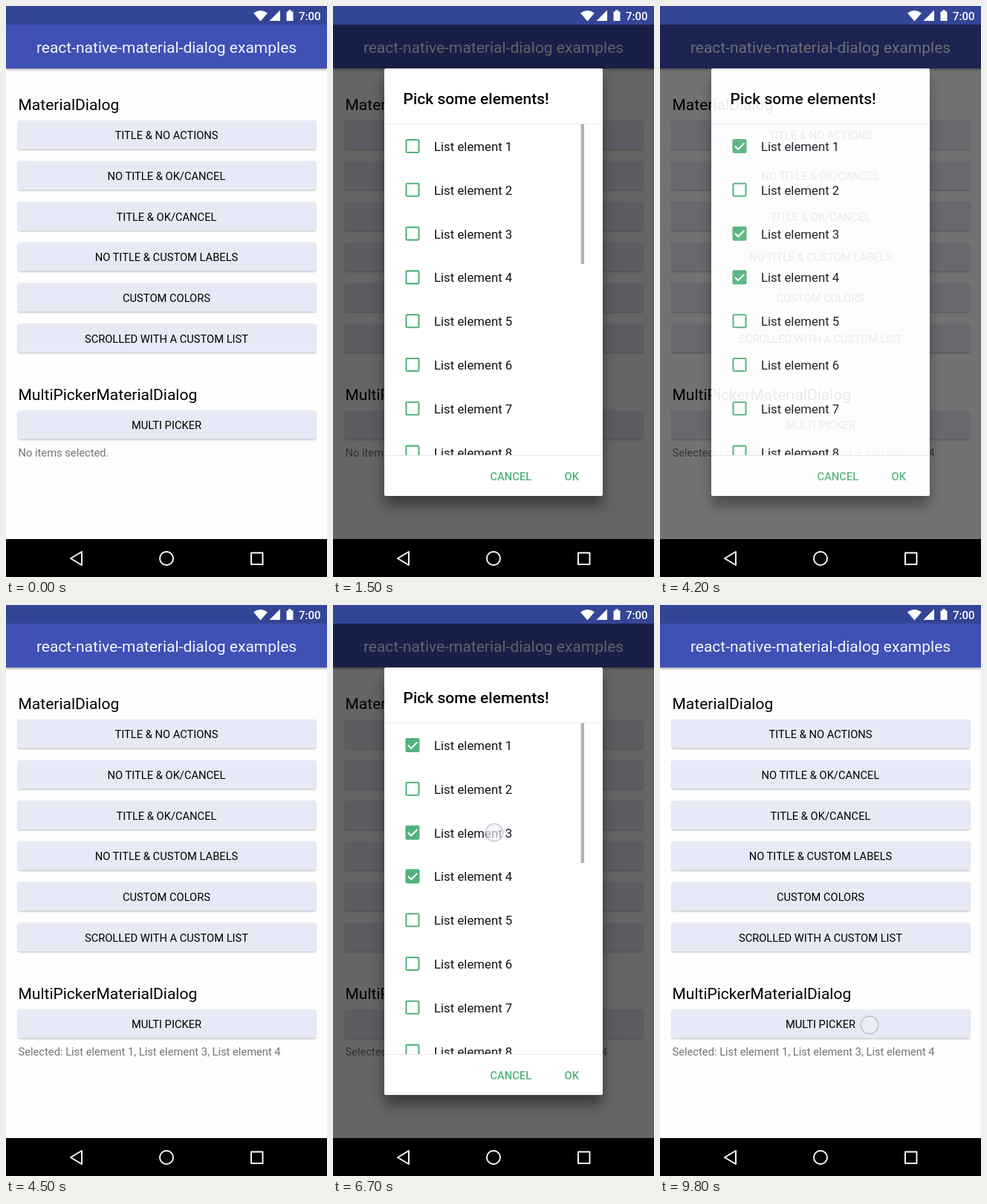
These frames come from a looping animation (432 by 768 pixels, 10000 ms). An HTML page:

```html
<!DOCTYPE html>
<html lang="en">
<head>
<meta charset="utf-8">
<title>Multi picker dialog</title>
<style>
  html, body { margin: 0; width: 100%; height: 100%; overflow: hidden; background: #fff; }
  svg { display: block; width: 432px; height: 768px; font: 14.7px Roboto, sans-serif; }
  .big { font-size: 21px; }
  .medium { font-weight: 500; }
  .item { font-size: 16.8px; fill: #101018; }
  .center { text-anchor: middle; }
  .panel { filter: drop-shadow(0 13px 9px rgba(0, 0, 0, .42)); }
  .button { fill: #e7eaf6; filter: drop-shadow(0 1.5px 1px rgba(0, 0, 0, .28)); }
  .bar { filter: drop-shadow(0 2px 1.5px rgba(0, 0, 0, .3)); }
</style>
</head>
<body>
<svg viewBox="0 0 432 768">
  <defs>
    <clipPath id="listClip"><rect x="69" y="159" width="294" height="445"/></clipPath>
    <clipPath id="buttonClip"><rect x="16" y="544" width="401" height="39" rx="2"/></clipPath>
  </defs>
  <rect width="432" height="768" fill="#fefefe"/>
  <rect class="bar" y="20" width="432" height="64" fill="#3f51b5"/>
  <text class="big center" x="216" y="63" fill="#f4f5fb">react-native-material-dialog examples</text>
  <text class="big" x="16.5" y="140">MaterialDialog</text>
  <text class="big" x="16.5" y="530">MultiPickerMaterialDialog</text>
  <g id="buttons"></g>
  <g clip-path="url(#buttonClip)"><circle id="ripple" cx="282" cy="565" fill="#1c2340"/></g>
  <text id="summary" x="16.5" y="606" fill="#757575"></text>

  <g id="modal">
    <rect y="25" width="432" height="692" fill="#000" fill-opacity=".6"/>
    <rect class="panel" x="69" y="84" width="294" height="575" rx="2" fill="#fff"/>
    <text class="big medium" x="94.5" y="132">Pick some elements!</text>
    <g id="list" clip-path="url(#listClip)"></g>
    <path d="M69 158.5h294M69 604.5h294" stroke="#e9e9e9"/>
    <rect id="scrollbar" x="333.6" y="159" width="4.4" fill="#b2b2b4"/>
    <g class="medium" fill="#51b37a">
      <text x="211.5" y="637.5">CANCEL</text>
      <text x="311.5" y="637.5">OK</text>
    </g>
  </g>

  <rect width="432" height="25" fill="#354596"/>
  <g fill="#fff">
    <path d="M333 9.5Q342.5 2.500 352 9.500L342.500 20.500ZM369 5.500V20H354.500ZM377.500 7.500h2.500v-2h4v2h2.500V20h-9z"/>
    <text class="medium" x="394" y="18.500" font-size="15">7:00</text>
  </g>
  <rect y="717" width="432" height="51"/>
  <g fill="none" stroke="#fff" stroke-width="1.9" stroke-linejoin="round">
    <path d="M87 743L102 734V752Z"/>
    <circle cx="216" cy="743" r="9"/>
    <rect x="330" y="735.500" width="15.500" height="15.500"/>
  </g>
  <circle id="touch" r="11.700" fill="#f0f2f8" fill-opacity=".68" stroke="#969bbe" stroke-opacity=".55" stroke-width="1.500"/>
</svg>
<script>
const LOOP = 10000, STEP = 100;
const OPENS = [500, 5200], CLOSES = [3700, 8100];

// Touches: start time, x, y
const touches = [
  [500, 282, 565], [1900, 217, 189], [2450, 217, 307], [3000, 217, 365], [3700, 316, 625],
  [5200, 282, 565], [6700, 217, 306], [7300, 217, 365], [8100, 240, 635], [9400, 282, 565]
];

// Times at which each list row changes state
const toggles = { 0: [2300], 2: [2850, 7100], 3: [3400, 7700] };

const $ = id => document.getElementById(id);
const clamp = v => Math.max(0, Math.min(1, v));
const ramp = (t, start, length) => clamp((t - start) / length);

const labels = ['TITLE &amp; NO ACTIONS', 'NO TITLE &amp; OK/CANCEL', 'TITLE &amp; OK/CANCEL',
  'NO TITLE &amp; CUSTOM LABELS', 'CUSTOM COLORS', 'SCROLLED WITH A CUSTOM LIST', 'MULTI PICKER'];

$('buttons').innerHTML = labels.map((label, i) => {
  const y = i < 6 ? 154 + i * 54.7 : 544;
  return `<rect class="button" x="16" y="${y}" width="401" height="38.5" rx="2"/>
    <text class="center" x="216" y="${y + 25.2}">${label}</text>`;
}).join('');

$('list').innerHTML = Array.from({ length: 8 }, (_, i) => `
  <g transform="translate(0 ${i * 58.8})">
    <rect x="98.500" y="180" width="17" height="17" rx="1.200" stroke="#51b37a" stroke-width="2.100"/>
    <path d="M101 188.500l4.200 4.200 8.200-8.200" fill="none" stroke="#fff" stroke-width="2.100"/>
    <text class="item" x="136" y="195">List element ${i + 1}</text>
  </g>`).join('');
const rows = [...$('list').children];

function draw(t) {
  const opened = OPENS.filter(start => start <= t).pop() ?? -LOOP;
  const age = t - opened;
  const closing = CLOSES.find(start => start > opened);
  const fade = ramp(age, 540, 220) * (1 - ramp(t, closing + 480, 240));
  $('modal').setAttribute('opacity', opened < 0 ? 0 : fade);

  $('scrollbar').setAttribute('height', age < 650 ? 258 : 188);
  $('scrollbar').setAttribute('opacity', 1 - ramp(age, 1500, 300));

  $('ripple').setAttribute('r', Math.max(0, 8 + (age - 450) * 0.21));
  $('ripple').setAttribute('opacity', age < 450 ? 0 : 0.3 * (1 - ramp(age, 600, 300)));

  $('summary').textContent = t < 4150 ? 'No items selected.'
    : 'Selected: List element 1, List element 3, List element 4';

  rows.forEach((row, i) => {
    const checked = (toggles[i] || []).filter(time => time <= t).length % 2;
    row.children[0].setAttribute('fill', checked ? '#51b37a' : 'none');
    row.children[1].setAttribute('opacity', checked);
  });

  const [start, x, y] = touches.filter(touch => touch[0] <= t).pop() || [-LOOP, 0, 0];
  const touch = $('touch');
  touch.setAttribute('cx', x);
  touch.setAttribute('cy', y);
  touch.setAttribute('opacity', start === 9400 ? 1 : 1 - ramp(t - start, 360, 140));
}

let origin;
function frame(now) {
  origin ??= now;
  draw(Math.floor((now - origin) % LOOP / STEP) * STEP);
  requestAnimationFrame(frame);
}
draw(0);
requestAnimationFrame(frame);
</script>
</body>
</html>
```
